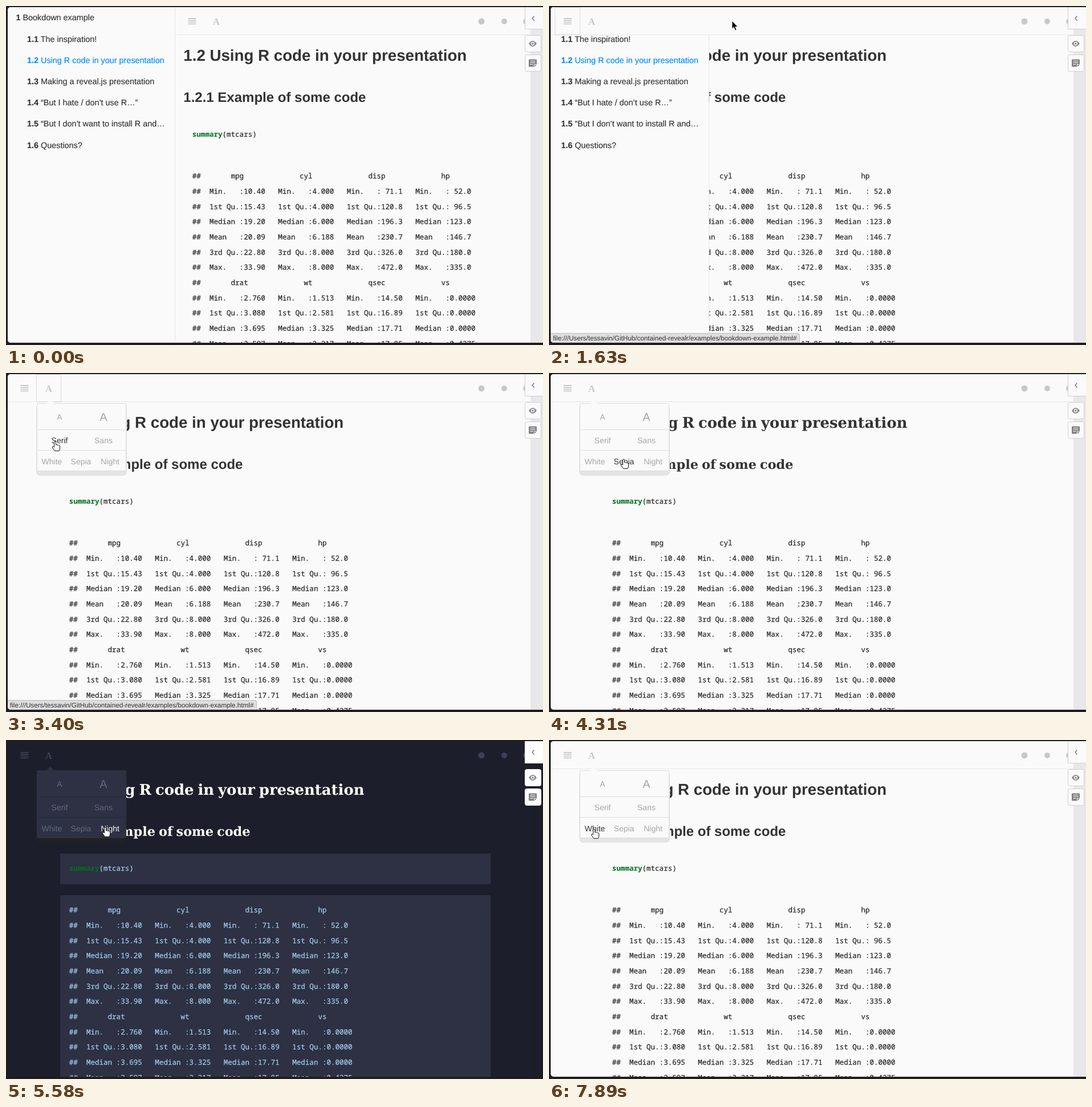
An HTML page for the animation above (8 s loop, 942 by 594 pixels).

```html
<!DOCTYPE html>
<html lang="en">
<head>
<meta charset="utf-8">
<title>Book viewer themes</title>
<style>
html, body { margin: 0; width: 100%; height: 100%; overflow: hidden; background: #201e1e; }
svg {
  display: block; width: 942px; height: 594px;
  font-family: "Liberation Sans", Arial, sans-serif;
  text-rendering: geometricPrecision;
  --bg: #fafafa; --line: #e7e7e7; --strip: #e8e8e8; --icon: #c8c8c8; --iconHover: #444;
  --head: #333; --code: #2b2b2b; --codeBg: #fafafa;
  --menu: #fafafa; --menuEdge: #dcdcdc; --menuLine: #dedede; --item: #a6a6a6; --itemHover: #333;
  --plate: #e4e4e4; --shade: 0; --panelEdge: #cfcfcf; --panel: #fafafa;
}
svg.sepia {
  --bg: #f2e8c8; --line: #e3d8b8; --strip: #dfd6b8; --icon: #ada283; --iconHover: #704214;
  --head: #704214; --code: #5d7279; --codeBg: #fdf6e3;
  --menu: #111; --menuEdge: #111; --menuLine: #86816f; --item: #afa790; --itemHover: #73553c;
  --plate: none; --shade: .3; --panelEdge: #d5ccb0; --panel: #fff;
}
svg.night {
  --bg: #1c1f2b; --line: none; --strip: #1b1e29; --icon: #3c4158; --iconHover: #f4f4f5;
  --head: #fffff5; --code: #a3c9ea; --codeBg: #2d3143;
  --menu: #2d3143; --menuEdge: #2d3143; --menuLine: #25293a; --item: #62677f; --itemHover: #f4f4f5;
  --plate: none; --shade: .2; --panelEdge: #fff; --panel: #fff;
}
.bg { fill: var(--bg); }
.icon { fill: var(--icon); }
.icon.hover { fill: var(--iconHover); }
.heading { fill: var(--head); font-weight: bold; }
#h1 { font-size: 27.7px; }
#h2 { font-size: 24px; }
.serif .heading { font-family: "DejaVu Serif", "Noto Serif", serif; text-anchor: end; word-spacing: -.08em; }
.serif #h1 { font-size: 25.9px; }
.serif #h2 { font-size: 22.4px; }
.code {
  fill: var(--code); stroke: var(--code); stroke-width: .25;
  font: 12.55px "Noto Sans Mono", "DejaVu Sans Mono", monospace; white-space: pre;
}
.keyword { fill: #007020; stroke: none; font-weight: bold; }
.codeBg { fill: var(--codeBg); }
.toc { fill: #333; stroke: #333; stroke-width: .15; font-size: 14.4px; }
.num { font-weight: bold; }
.active { fill: #008cff; stroke: #008cff; }
.item { fill: var(--item); font-size: 14px; text-anchor: middle; }
.item.hover { fill: var(--itemHover); }
.panel { fill: var(--panel); stroke: var(--panelEdge); }
.focus { fill: none; stroke: #bbb; stroke-dasharray: 1 1; }
</style>
</head>
<body>
<svg id="stage" viewBox="0 0 942 594">
  <defs>
    <clipPath id="page"><rect x="3" y="2" width="950" height="588" rx="5"/></clipPath>
    <filter id="blur" x="-20%" y="-20%" width="140%" height="150%"><feGaussianBlur stdDeviation="5"/></filter>
  </defs>
  <rect width="942" height="594" fill="#201e1e"/>
  <g clip-path="url(#page)">
    <rect class="bg" width="942" height="594"/>

    <g id="doc">
      <text id="h1" class="heading" y="96">1.2 Using R code in your presentation</text>
      <text id="h2" class="heading" y="168">1.2.1 Example of some code</text>
      <rect class="codeBg" x="95" y="199" width="755" height="53.5"/>
      <rect class="codeBg" x="95" y="272" width="755" height="330"/>
      <text class="code" x="110.8" y="229.3"><tspan class="keyword">summary</tspan>(mtcars)</text>
      <g id="table"></g>
    </g>

    <g id="sidebar">
      <rect x="3" y="2" width="293" height="588" fill="#fafafa"/>
      <path d="M296.5 2V590" stroke="#e4e4e4"/>
    </g>

    <rect id="bar" class="bg" y="2" width="942" height="48"/>
    <path id="barLine" stroke="var(--line)"/>
    <g id="tools">
      <path id="listIcon" class="icon" d="M25.5 21h14v1.7h-14zm0 3.2h14v1.7h-14zm0 3.2h14v1.7h-14zm0 3.2h14v1.7h-14z"/>
      <text id="fontIcon" class="icon" x="75" y="33" font-size="17" font-weight="bold" text-anchor="middle" font-family="Liberation Serif, serif">A</text>
      <rect id="listFocus" class="focus" x="10.5" y="2.5" width="44" height="48"/>
      <rect id="fontFocus" class="focus" x="53.5" y="2.5" width="43" height="48"/>
    </g>
    <circle class="icon" cx="834" cy="27" r="5.5"/>
    <circle class="icon" cx="874" cy="27" r="5"/>
    <circle class="icon" cx="912.5" cy="27" r="5.5"/>

    <rect x="920" y="2" width="22" height="588" fill="var(--strip)"/>
    <rect class="panel" x="910.5" y="1.5" width="40" height="39"/>
    <rect class="panel" x="910.5" y="51.5" width="28" height="29" rx="3"/>
    <rect class="panel" x="910.5" y="85.5" width="28" height="29" rx="3"/>
    <path d="M926.5 17.5l-3.5 4 3.5 4" fill="none" stroke="#777" stroke-width="1.4"/>
    <path d="M917 66q7-10 14 0q-7 10-14 0z" fill="#888"/>
    <circle cx="924" cy="66" r="2.5" fill="#888" stroke="#fff" stroke-width="1.3"/>
    <path d="M918 93.5h12q1 0 1 1v8l-4 4h-9q-1 0-1-1v-11q0-1 1-1z" fill="#808080"/>
    <path d="M919.5 96.5h9M919.5 99.5h9M919.5 102.5h5M926.5 106v-3.5h4" fill="none" stroke="#fff"/>

    <g id="status">
      <path d="M2.5 573.5H436q3.5 0 3.5 3.5V590.5H2.5z" fill="#dedede" stroke="#bdbdbd"/>
      <text x="7" y="585.5" font-size="11.7" fill="#333">file:///Users/tessavin/GitHub/contained-revealr/examples/bookdown-example.html#</text>
    </g>

    <g id="menu">
      <rect x="55" y="59" width="155" height="119" rx="4" fill="#3a2a10" filter="url(#blur)" style="opacity:var(--shade)"/>
      <rect x="53" y="54" width="159" height="126" rx="7" fill="var(--plate)"/>
      <path d="M62 174.5H203" stroke="var(--plate)" stroke-width="3" opacity=".6"/>
      <rect x="54.5" y="53.5" width="156" height="118" rx="1.5" fill="var(--menu)" stroke="var(--menuEdge)"/>
      <path d="M69.5 54.5L77.5 46.5L85.5 54.5z" fill="var(--menu)"/>
      <path d="M55 99.5H210M55 135.5H210" stroke="var(--menuLine)"/>
    </g>
    <g id="cursor">
      <path id="arrow" d="M0 0V14.2l3.2-3 2.4 5.6 2.5-1-2.4-5.4h4.5z" fill="#000" stroke="#fff" stroke-width=".9"/>
      <path id="hand" d="M-1.5 8.5V1.5a1.5 1.5 0 0 1 3 0V6q1.5-1 2.6.3 1.5-.8 2.5.5 2-.3 2 1.5V11q0 3-1.5 5.5H-.5q-1-2-4-5.5-1-1.8.5-2.2 1.5 0 2.5 1.2z" fill="#fff" stroke="#111"/>
    </g>
  </g>
</svg>
<script>
const $ = id => document.getElementById(id);
const stage = $('stage');

function add(parent, name, attrs, text = '') {
  const node = document.createElementNS('http://www.w3.org/2000/svg', name);
  for (const key in attrs) node.setAttribute(key, attrs[key]);
  node.textContent = text;
  parent.append(node);
  return node;
}

// Summary table: name, column of the name, values
const stats = ['Min.', '1st Qu.', 'Median', 'Mean', '3rd Qu.', 'Max.'];
const blocks = [
  [['mpg', 9, '10.40 15.43 19.20 20.09 22.80 33.90'],
   ['cyl', 25, '4.000 4.000 6.000 6.188 8.000 8.000'],
   ['disp', 41, '71.1 120.8 196.3 230.7 326.0 472.0'],
   ['hp', 58, '52.0 96.5 123.0 146.7 180.0 335.0']],
  [['drat', 9, '2.760 3.080 3.695 3.597'],
   ['wt', 26, '1.513 2.581 3.325 3.217'],
   ['qsec', 41, '14.50 16.89 17.71 17.85'],
   ['vs', 58, '0.0000 0.0000 0.0000 0.4375']]
];
const lines = blocks.flatMap(block => {
  const head = block.reduce((line, [name, col]) => line.padEnd(col) + name, '##');
  const columns = block.map(entry => entry[2].split(' '));
  const rows = columns[0].map((_, i) => '##  ' + columns
    .map(values => (stats[i].padEnd(7) + ':' + values[i].padStart(5)).padEnd(16)).join(''));
  return [head, ...rows];
});
lines.forEach((line, i) =>
  add($('table'), 'text', { class: 'code', x: 110.8, y: 302.4 + i * 26.67 }, line));

const chapters = ['1 Bookdown example', '1.1 The inspiration!', '1.2 Using R code in your presentation',
  '1.3 Making a reveal.js presentation', '1.4 “But I hate / don’t use R…”',
  '1.5 “But I don’t want to install R and…', '1.6 Questions?'];
const links = chapters.map((title, i) => {
  const [num, ...words] = title.split(' ');
  const link = add($('sidebar'), 'text',
    { class: i === 2 ? 'toc active' : 'toc', x: i ? 37 : 17.4, y: 25.4 + i * 37.2 });
  add(link, 'tspan', { class: 'num' }, num);
  add(link, 'tspan', {}, ' ' + words.join(' '));
  return link;
});

// Menu items: label, centre, baseline, hover cell (left, right, top, bottom), size
const items = [
  ['A', 94, 82, 54, 133, 53, 99, 14], ['A', 171, 84, 133, 211, 53, 99, 20],
  ['Serif', 94, 123, 54, 133, 99, 135, 14], ['Sans', 171, 123, 133, 211, 99, 135, 14],
  ['White', 80.5, 159.5, 54, 106, 135, 172, 14], ['Sepia', 131.5, 159.5, 106, 157, 135, 172, 14],
  ['Night', 182.5, 159.5, 157, 211, 135, 172, 14]
].map(([label, x, y, left, right, top, bottom, size]) => ({
  node: add($('menu'), 'text', { class: 'item', x, y, style: `font-size:${size}px` }, label),
  over: (px, py) => px >= left && px < right && py >= top && py < bottom
}));

// Pointer path: time, x, y
const path = [
  [240, 731, 195], [359, 731, 195], [360, 536, 121], [780, 536, 121], [1150, 288, 24], [1220, 288, 24],
  [1330, 321, 26], [1900, 321, 26], [2300, 66, 24], [2360, 66, 24], [2470, 74, 28], [3090, 74, 28],
  [3400, 86, 120], [3960, 86, 120], [4130, 92, 148], [4310, 131, 151], [4850, 131, 151], [5100, 174, 153],
  [6360, 174, 153], [6530, 171, 118], [7180, 171, 118], [7540, 79, 158], [7889, 79, 158], [7890, 79, 156]
];
const clamp = v => Math.max(0, Math.min(1, v));
const smooth = v => v * v * (3 - 2 * v);
const ramp = (t, from, to) => clamp((t - from) / (to - from));

function pointer(t) {
  const next = path.findIndex(key => key[0] > t);
  if (next < 0) return path[path.length - 1].slice(1);
  if (next === 0) return path[0].slice(1);
  const a = path[next - 1], b = path[next];
  const k = smooth(ramp(t, a[0], b[0]));
  return [a[1] + (b[1] - a[1]) * k, a[2] + (b[2] - a[2]) * k];
}

const show = (id, on) => $(id).style.display = on ? '' : 'none';
const move = (id, x, y = 0) => $(id).setAttribute('transform', `translate(${x} ${y})`);

function draw(t) {
  const open = t < 1570;
  const menu = t >= 2700;
  const serif = t >= 3750 && t < 6950;
  const theme = t < 4610 || t >= 7770 ? 'white' : t < 5580 ? 'sepia' : 'night';
  const [x, y] = pointer(t);
  const visible = t >= 240;

  stage.setAttribute('class', theme + (serif ? ' serif' : ''));
  move('doc', open ? 216 : 0);
  $('h1').setAttribute('x', serif ? 628.5 : 95.3);
  $('h2').setAttribute('x', serif ? 428.5 : 95.3);

  show('sidebar', t < 1872);
  move('sidebar', -300 * smooth(ramp(t, 1592, 1872)));
  links[0].style.textDecoration = visible && open && x < 297 && y < 40 ? 'underline' : 'none';

  const barLeft = open ? 297 : 3;
  $('bar').setAttribute('x', barLeft);
  $('barLine').setAttribute('d', `M${barLeft} 50.5H920`);
  move('tools', open ? 294 : 0);
  const toolX = x - (open ? 294 : 0);
  const onBar = visible && y < 50;
  const onList = onBar && toolX > 10 && toolX < 54;
  const onFont = onBar && toolX >= 54 && toolX < 97;
  $('listIcon').classList.toggle('hover', onList);
  $('fontIcon').classList.toggle('hover', onFont);
  show('listFocus', t >= 1510 && t < 2650);
  show('fontFocus', t >= 2650 && t < 3750);

  $('status').style.opacity = t < 1510 ? 0
    : t < 2650 ? 1 - ramp(t, 1920, 2120)
    : 1 - ramp(t, 3460, 3640);

  show('menu', menu);
  items.forEach(item => item.node.classList.toggle('hover', menu && item.over(x, y)));

  const hand = onList || onFont || menu || (open && x < 297);
  show('cursor', visible);
  move('cursor', x, y);
  show('hand', hand);
  show('arrow', !hand);
}

const start = performance.now();
function tick() {
  draw((performance.now() - start) % 8000);
  requestAnimationFrame(tick);
}
draw(0);
requestAnimationFrame(tick);
</script>
</body>
</html>
```
